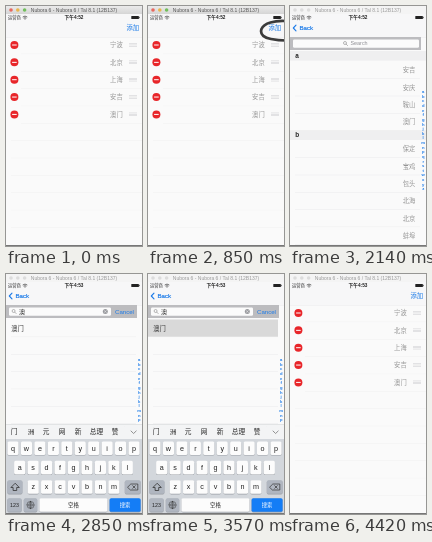
An HTML page for the animation above (4.71 s loop, 136 by 240 pixels).

```html
<!DOCTYPE html>
<html lang="zh">
<head>
<meta charset="utf-8">
<title>City picker</title>
<style>
html, body { margin: 0; width: 100%; height: 100%; overflow: hidden; background: #fafafa; }
svg { display: block; width: 100vw; height: 100vh; }
text { font-family: "Liberation Sans", "Noto Sans CJK SC", "Noto Sans CJK", sans-serif; }
.home, .search, .query, .tap, .late, .early, .active, .idle, .pressed, .ring { animation: 4.71s step-end infinite; }
.home { animation-name: home; }
.search { animation-name: search; }
.query { animation-name: query; }
.tap { animation-name: tap; }
.early { animation-name: early; }
.late { animation-name: late; }
.active { animation-name: active; }
.idle { animation-name: idle; }
.pressed { animation-name: press; }
.ring { animation-name: ring; stroke-dasharray: 100; }
@keyframes home { 0%, 87.89% { visibility: visible } 45.43% { visibility: hidden } }
@keyframes search { 0%, 60.5% { visibility: hidden } 45.43% { visibility: visible } }
@keyframes query { 0%, 87.89% { visibility: hidden } 60.5% { visibility: visible } }
@keyframes tap { 0%, 87.89% { visibility: hidden } 75.79% { visibility: visible } }
@keyframes early { 0% { visibility: visible } 60.5% { visibility: hidden } }
@keyframes late { 0% { visibility: hidden } 60.5% { visibility: visible } }
@keyframes active { 0% { visibility: visible } 33.33% { visibility: hidden } }
@keyframes idle { 0% { visibility: hidden } 33.33% { visibility: visible } }
@keyframes press { 0%, 45.43% { opacity: 1 } 33.33% { opacity: .25 } }
@keyframes ring {
  0% { stroke-dashoffset: 100; opacity: 0 }
  5.94% { stroke-dashoffset: 80; opacity: 1 }
  8.91% { stroke-dashoffset: 60; opacity: 1 }
  12.1% { stroke-dashoffset: 38; opacity: 1 }
  15.07% { stroke-dashoffset: 18; opacity: 1 }
  18.04% { stroke-dashoffset: 0; opacity: 1 }
  33.33% { opacity: 0 }
}
</style>
</head>
<body>
<svg id="stage" viewBox="0 0 136 240" preserveAspectRatio="none"></svg>
<script>
const BLUE = '#1a7ae8';
const rect = (x, y, w, h, fill, r = 0) =>
  `<rect x="${x}" y="${y}" width="${w}" height="${h}" rx="${r}" fill="${fill}"/>`;
const text = (s, x, y, size, fill, anchor = 'start', weight = 400) =>
  `<text x="${x}" y="${y}" font-size="${size}" fill="${fill}" text-anchor="${anchor}" font-weight="${weight}">${s}</text>`;
const path = (d, stroke, width = .6, extra = '') =>
  `<path d="${d}" fill="none" stroke="${stroke}" stroke-width="${width}" stroke-linecap="round" stroke-linejoin="round" ${extra}/>`;
const dot = (x, y, r, fill) => `<circle cx="${x}" cy="${y}" r="${r}" fill="${fill}"/>`;
const group = (name, body) => `<g class="${name}">${body}</g>`;
const line = (x, y, w, fill = '#e6e6e8') => rect(x, y, w, .4, fill);
const lens = (x, y) => `<circle cx="${x}" cy="${y}" r="1.5" fill="none" stroke="#888" stroke-width=".6"/>` +
  path(`M${x + 1.1} ${y + 1.1}l1.5 1.5`, '#888');

function titleBar(fill, ink, lights) {
  return rect(0, 0, 136, 8, fill) +
    lights.map((c, i) => dot(5 + i * 6.8, 4, 1.8, c)).join('') +
    text('Nubora 6 - Nubora 6 / Tal 8.1 (12B137)', 68, 5.8, 5, ink, 'middle');
}

function chrome() {
  const clock = t => text('下午' + t, 68, 13.3, 4.7, '#222', 'middle', 700);
  return group('active', titleBar('url(#bar)', '#555', ['#e8685f', '#e9b64c', '#72bf5c'])) +
    group('idle', titleBar('#f4f4f4', '#999', Array(3).fill('#dcdcdc'))) +
    rect(0, 8, 136, 23, '#f7f7f8') + line(0, 31, 136, '#c9c9cc') +
    text('运营商', 2, 13.2, 4.3, '#333') +
    path('M17 10.8q2-1.7 4 0M17.9 12q1.1-.8 2.2 0', '#333', .7) + dot(19, 13, .5, '#333') +
    group('early', clock('4:52')) + group('late', clock('4:53')) +
    rect(125.3, 10, 7.6, 3, '#222', .5) + rect(133.2, 10.8, .6, 1.4, '#222');
}

function home() {
  let s = rect(0, 31.4, 136, 209, '#fafafa');
  ['宁波', '北京', '上海', '安吉', '澳门'].forEach((city, i) => {
    const y = 39 + i * 17.35;
    s += dot(8.4, y, 4, '#e8262a') + rect(6.1, y - .5, 4.6, 1, '#fff') +
      text(city, 116.7, y + 2.3, 6.3, '#959595', 'end');
    for (let k = -1; k < 2; k++) s += rect(123, y + k * 1.4 - .3, 8, .5, '#c9c9cc');
  });
  for (let i = 0; i < 11; i++) s += line(i < 5 ? 15 : 5, 47.7 + i * 17.35, 131, '#ededee');
  return s + group('pressed', text('添加', 133, 24.4, 6.3, BLUE, 'end')) +
    path('M137 15C127 14.5 116 17 113.5 23C111.5 29 117 32 123 33C128 34 133 34.5 138 34.5',
      '#3b3b3b', 2.7, 'class="ring" pathLength="100"');
}

function back() {
  return path('M6 19.2l-2.7 2.8l2.7 2.8', BLUE, 1.1) +
    `<g stroke="${BLUE}" stroke-width=".2">${text('Back', 9.4, 24.3, 6.2, BLUE)}</g>`;
}

function searchBar(width) {
  return rect(0, 31, 131, 13, '#bcbcbf') + rect(3, 33.4, width, 8.4, '#fbfbfb', 1.4);
}

function index() {
  return [...'abcdefghjklmnpqrstwxyz'].map((c, i) =>
    text(c, 133.2, 87.2 + i * 4.62, 4.2, BLUE, 'middle', 700)).join('');
}

function browse() {
  let s = rect(0, 31.4, 136, 209, '#fafafa') + back() + searchBar(126) +
    lens(55, 37) + text('Search', 60.5, 39.3, 5.4, '#8e8e93');
  const section = (name, y, first, cities) => {
    s += rect(0, y, 136, 9.6, '#efeff0') + text(name, 5.2, y + 6.8, 6.4, '#222', 'start', 700);
    cities.forEach((city, i) => {
      const cy = first + i * 17.3;
      s += text(city, 125.3, cy + 2.3, 6.3, '#959595', 'end') + line(5, cy + 8.5, 125);
    });
  };
  section('a', 45, 64, ['安吉', '安庆', '鞍山', '澳门']);
  section('b', 124.3, 143, ['保定', '宝鸡', '包头', '北海', '北京', '蚌埠']);
  return s + index();
}

function key(x, y, w, label, fill = '#fcfcfc', ink = '#222', size = 7.2) {
  return rect(x, y + .6, w, 13.6, '#9b9fa5', 1.6) + rect(x, y, w, 13.6, fill, 1.6) +
    text(label, x + w / 2, y + 6.8 + size * .32, size, ink, 'middle');
}

function keyboard() {
  const gray = '#b0b6c0';
  let s = rect(0, 150, 136, 90, '#d3d7dc') + rect(0, 150, 136, 15, '#f3f4f5') + line(0, 150, 136, '#c8cacd');
  [['门', 8], ['洲', 25], ['元', 40], ['网', 56], ['新', 72], ['总理', 90.5], ['赞', 109]]
    .forEach(([word, x]) => s += text(word, x, 160.4, 6.7, '#222', 'middle'));
  s += line(118.5, 152, .4) + path('M125 157l2.6 2.5l2.6-2.5', '#777', .8);
  [['qwertyuiop', 1.4], ['asdfghjkl', 8.1], ['zxcvbnm', 21.6]].forEach(([row, x], r) =>
    [...row].forEach((c, i) => s += key(x + i * 13.45, 167.4 + r * 19.4, 11.2, c)));
  s += key(1.4, 206.2, 15, '', gray) + path('M8.9 209.5l-4 4h2.2v3h3.6v-3h2.2z', '#333', .8) +
    key(118.8, 206.2, 15.8, '', gray) +
    path('M121.8 213l3-3h7v6h-7zM126.7 211.7l2.6 2.6m0-2.6l-2.6 2.6', '#333', .7) +
    key(1.4, 224.2, 14.2, '123', gray, '#222', 5.3) + key(17.8, 224.2, 13.4, '', gray) +
    path('M20.9 231a3.6 3.6 0 1 0 7.2 0a3.6 3.6 0 1 0-7.2 0h7.2M24.5 227.4v7.2M24.5 227.4q-3.4 3.6 0 7.2q3.4-3.6 0-7.2', '#333', .5) +
    key(33.4, 224.2, 68, '空格', '#fcfcfc', '#222', 5.4) +
    key(103.6, 224.2, 31, '搜索', '#147df6', '#fff', 5.4);
  return s;
}

function query() {
  let s = rect(0, 31.4, 136, 209, '#fafafa') + back() + searchBar(102) +
    lens(7.6, 37) + text('澳', 13, 39.6, 6, '#333') +
    dot(99.3, 37.5, 2.5, '#999a9e') + path('M98.4 36.6l1.8 1.8m0-1.8l-1.8 1.8', '#fff', .5) +
    text('Cancel', 109, 39.5, 6.1, BLUE);
  for (let y = 62.7; y < 150; y += 17.35) s += line(5, y, 125);
  return s + group('tap', rect(0, 45.5, 130, 17.2, '#d9d9d9')) +
    text('澳门', 5.3, 56.5, 6.3, '#333') + index() + keyboard();
}

document.getElementById('stage').innerHTML =
  '<defs><linearGradient id="bar" x2="0" y2="1"><stop stop-color="#ebebeb"/><stop offset="1" stop-color="#d5d5d5"/></linearGradient></defs>' +
  rect(0, 0, 136, 240, '#fafafa') + chrome() +
  group('home', home()) + group('search', browse()) + group('query', query()) +
  rect(0, 239, 136, 1, '#777');
</script>
</body>
</html>
```
